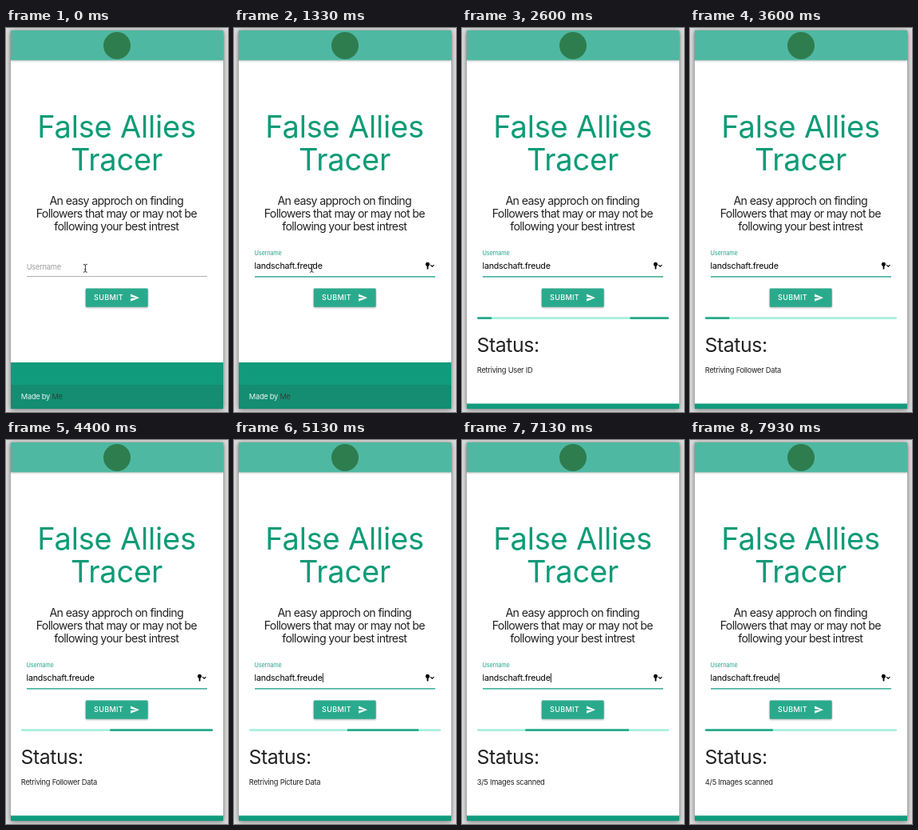
Animation, 278 px wide and 480 px high, one loop 8000 ms. Source, as an HTML page:

```html
<!DOCTYPE html>
<html lang="en">
<head>
<meta charset="utf-8">
<title>False Allies Tracer</title>
<style>
html, body { margin: 0; width: 100%; height: 100%; overflow: hidden; background: #dcdcdc; }
svg { display: block; width: 278px; height: 480px; font-family: Inter, "Open Sans", sans-serif; fill: #222; }
.page { filter: drop-shadow(0 1px 3px rgba(0,0,0,.5)); }
.header { fill: #4fb8a2; filter: drop-shadow(0 1px 1px rgba(0,0,0,.25)); }
.title { font-size: 38px; letter-spacing: -.2px; fill: #0d9b77; }
.lead { font-size: 14.2px; letter-spacing: -.65px; }
.mid { text-anchor: middle; }
.small { font-size: 9.3px; letter-spacing: -.26px; }
.value { font-size: 10.67px; letter-spacing: -.2px; fill: #000; }
.submit { font-size: 9px; font-weight: 500; letter-spacing: .33px; fill: #fff; }
.status { font-size: 24.8px; letter-spacing: -.4px; }
.button { fill: #2aaa8d; filter: drop-shadow(0 1px 1px rgba(0,0,0,.3)); }
</style>
</head>
<body>
<svg viewBox="0 0 278 480">
  <clipPath id="window"><rect x="6" y="3" width="266" height="473"/></clipPath>
  <clipPath id="track"><rect x="19" y="361.3" width="240" height="2.7" rx="1.3"/></clipPath>
  <rect class="page" x="6" y="3" width="266" height="473" fill="#fff"/>
  <rect class="header" x="6" y="3" width="266" height="37.3"/>
  <circle cx="139" cy="22" r="17" fill="#2e7d4f"/>

  <g class="title mid"><text x="138.5" y="136.5">False Allies</text><text x="138.5" y="178">Tracer</text></g>
  <g class="lead mid">
    <text x="138.3" y="221.4">An easy approch on finding</text>
    <text x="138.3" y="237.4">Followers that may or may not be</text>
    <text x="138.3" y="253.4">following your best intrest</text>
  </g>

  <text id="label" class="small">Username</text>
  <rect id="line" x="26" y="310.2" width="226"/>
  <text id="value" class="value" x="25.5" y="301">landschaft.freude</text>
  <rect id="caret" y="291.5" width="1" height="11.5"/>
  <g id="key" fill="#000">
    <circle cx="242.4" cy="295.3" r="2.5"/>
    <path d="M241.6 297h1.8v4l-.9.8-.9-.8z"/>
    <path d="M246 296.2l2.2 2 2.2-2" fill="none" stroke="#000" stroke-width="1.1"/>
  </g>

  <rect class="button" x="99.7" y="325.5" width="78" height="23.3" rx="1.4"/>
  <text class="submit" x="110" y="340.4">SUBMIT</text>
  <path d="M2.01 21L23 12 2.01 3 2 10l15 2-15 2z" fill="#fff" transform="translate(155 330.9) scale(.52)"/>

  <g id="result">
    <g clip-path="url(#track)">
      <rect x="19" y="361" width="240" height="4" fill="#a6f0dc"/>
      <g fill="#2aaa8d"><rect id="long" y="361" height="4"/><rect id="short" y="361" height="4"/></g>
    </g>
    <text class="status" x="18.5" y="405.3">Status:</text>
    <text id="message" class="small" x="18.8" y="430.8"></text>
  </g>

  <g clip-path="url(#window)">
    <g id="footer">
      <rect x="6" y="418" width="266" height="58" fill="#119b7d"/>
      <rect x="6" y="446" width="266" height="30" fill="#148d72"/>
      <text class="small" x="18.8" y="464.3" fill="#e9f5f2">Made by <tspan fill="#31413c">Me</tspan></text>
    </g>
  </g>
  <path id="pointer" d="M-2.5-5Q0-5 0-3.5Q0-5 2.5-5M0-4V4M-2.5 5Q0 5 0 3.5Q0 5 2.5 5M-1 1.5H1" fill="none" stroke="#333" stroke-width="1"/>
</svg>
<script>
const LOOP = 8000, FOCUS = 70, PASTE = 800, SEND = 1470, BAR_START = 1433;
const messages = [
  [SEND, "Retriving User ID"], [2930, "Retriving Follower Data"], [4470, "Retriving Picture Data"],
  [5500, "1/5 Images scanned"], [6200, "2/5 Images scanned"],
  [6950, "3/5 Images scanned"], [7650, "4/5 Images scanned"]
];
const el = id => document.getElementById(id);
const set = (id, attrs) => { for (const k in attrs) el(id).setAttribute(k, attrs[k]); };
const show = (id, on) => set(id, { visibility: on ? "visible" : "hidden" });
const clamp = v => Math.min(1, Math.max(0, v));
const mix = (a, b, p) => a + (b - a) * p;
const blend = (a, b, p) => `rgb(${a.map((v, i) => Math.round(mix(v, b[i], p)))})`;
const GREY = [158, 158, 158], TEAL = [38, 166, 142];

// CSS cubic-bezier easing
function bezier(x1, y1, x2, y2) {
  const at = (a, b, s) => 3 * a * s * (1 - s) ** 2 + 3 * b * s * s * (1 - s) + s ** 3;
  return x => {
    let lo = 0, hi = 1;
    for (let i = 0; i < 24; i++) {
      const s = (lo + hi) / 2;
      if (at(x1, x2, s) < x) lo = s; else hi = s;
    }
    return at(y1, y2, lo);
  };
}
const easeOut = bezier(0, 0, .58, 1);
const longEase = bezier(.65, .815, .735, .395);
const shortEase = bezier(.165, .84, .44, 1);

// Each sweep takes 60% of a 2.1 s cycle; edges are fractions of the track.
function sweep(id, time, ease, left, right) {
  const p = time < 0 ? 0 : ease(clamp(time % 2100 / 1260));
  const from = clamp(mix(left[0], left[1], p)), to = clamp(mix(right[0], right[1], p));
  set(id, { x: 19 + 240 * from, width: 240 * Math.max(0, to - from) });
}

function draw(t) {
  const lift = easeOut(clamp((t - FOCUS) / 200)), tint = easeOut(clamp((t - FOCUS) / 300));
  const focused = t >= FOCUS, pasted = t >= PASTE, sent = t >= SEND;
  set("label", {
    transform: `translate(${mix(25.7, 25.5, lift)} ${mix(302.2, 283.6, lift)}) scale(${mix(1, .79, lift)})`,
    fill: blend(GREY, TEAL, lift)
  });
  set("line", { height: mix(.8, 1.4, tint), fill: blend(GREY, TEAL, tint) });
  show("key", focused);
  show("value", pasted);
  show("caret", pasted ? t < 1330 || (t - 830) % 1000 < 500 : focused && t < 670);
  set("caret", { x: pasted ? 25.7 + el("value").getComputedTextLength() : 26 });

  show("pointer", !sent);
  set("pointer", { transform: `translate(${mix(99.3, 97.3, clamp((t - FOCUS) / 330))} 300.3)` });

  show("result", sent);
  set("footer", { transform: `translate(0 ${sent ? 51.5 : 0})` });
  sweep("long", t - BAR_START, longEase, [-.35, 1], [0, 1.9]);
  sweep("short", t - BAR_START - 1150, shortEase, [-2, 1.07], [0, 1.08]);
  const current = messages.filter(m => t >= m[0]).pop();
  el("message").textContent = current ? current[1] : "";
}

const start = performance.now();
function frame() {
  draw((performance.now() - start) % LOOP);
  requestAnimationFrame(frame);
}
frame();
</script>
</body>
</html>
```
